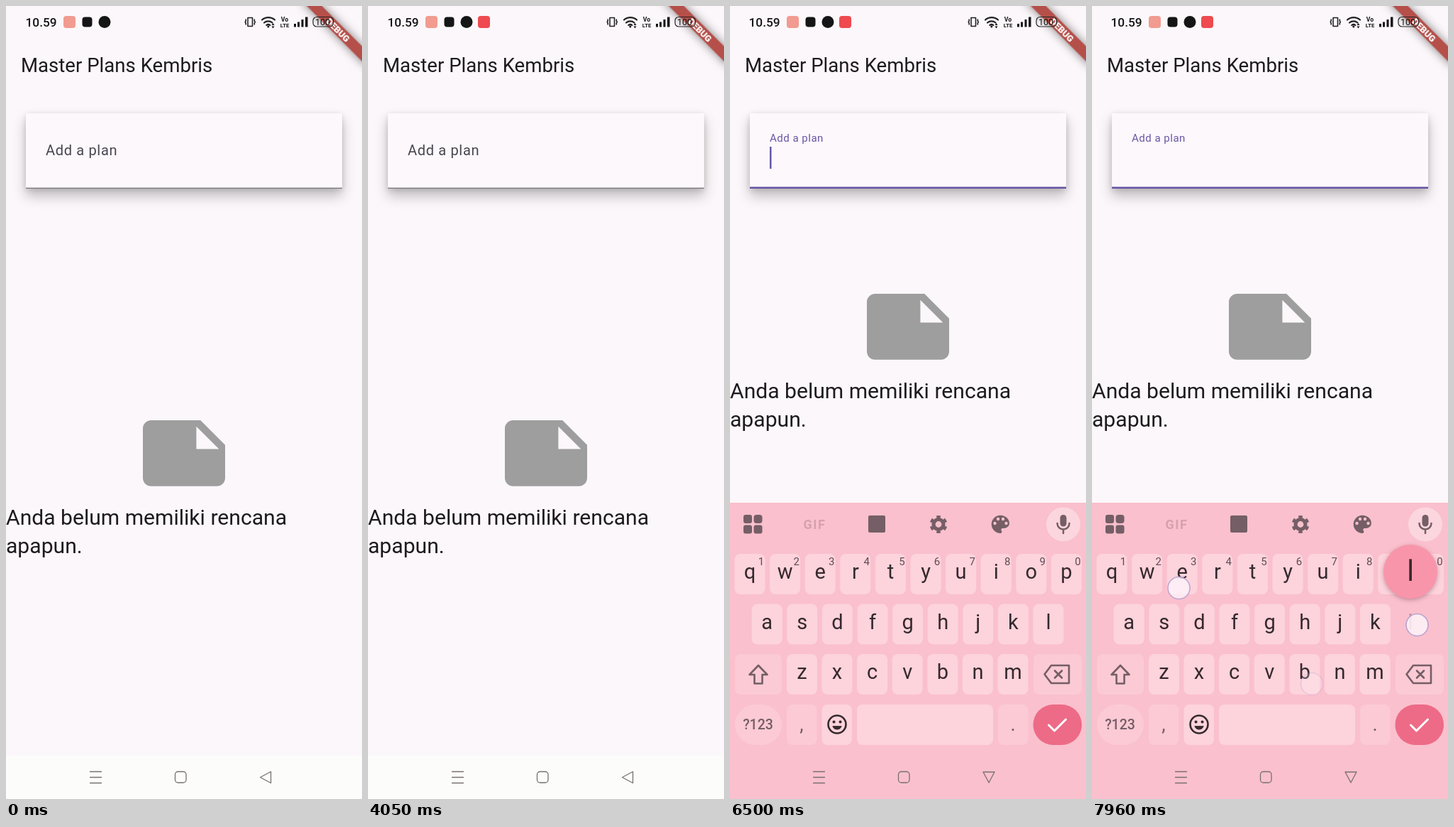
Write an HTML page that moves like this. It is 502 px wide and 1116 px high and loops after 8000 ms.

```html
<!DOCTYPE html>
<html lang="id">
<head>
<meta charset="utf-8">
<title>Master Plans</title>
<style>
  html, body { margin: 0; height: 100%; overflow: hidden; background: #fcf7fa; }
  svg { display: block; width: 100vw; height: 100vh; font-family: Roboto, sans-serif; }
  .mid { text-anchor: middle; }
  .line { fill: none; stroke-linecap: round; stroke-linejoin: round; }
  #card { fill: #fcf8fb; filter: drop-shadow(0 2px 4px rgba(0,0,0,.12)) drop-shadow(0 10px 9px rgba(0,0,0,.24)); }
  #banner { filter: drop-shadow(0 0 7px rgba(0,0,0,.5)); }
  .key { fill: #fdd3dc; }
  .soft { fill: #fbcad5; }
  .popup circle { fill: #f995aa; filter: drop-shadow(0 2px 3px rgba(90,30,50,.35)); }
  .dot { fill: rgba(255,246,252,.8); stroke: #b9a3d0; stroke-width: 1.6; }
</style>
</head>
<body>
<svg viewBox="0 0 502 1116">
  <rect width="502" height="1116" fill="#fcf7fa"/>
  <text x="21" y="92.5" font-size="27.6" fill="#1d1b20">Master Plans Kembris</text>

  <rect id="card" x="28" y="151" width="446" height="106"/>
  <rect id="underline" x="28" width="446"/>
  <text id="label" font-size="20.1" letter-spacing=".63">Add a plan</text>
  <rect id="cursor" x="56" y="198" width="2.5" height="31" fill="#6a57a8"/>

  <g id="empty">
    <path transform="translate(181.4 559.8) scale(5.8)" fill="#9e9e9e" d="M22 10l-6-6H4c-1.1 0-2 .9-2 2v12c0 1.1.9 2 2 2h16c1.1 0 2-.9 2-2zm-7-4.5l5.5 5.5H15z"/>
    <g font-size="30.1" fill="#1d1b20">
      <text x="0" y="729.7">Anda belum memiliki rencana</text>
      <text x="0" y="769.9">apapun.</text>
    </g>
  </g>

  <g id="banner" transform="translate(468.4 33.6) rotate(45)">
    <rect x="-65" y="-7.5" width="130" height="15" fill="#b54f49"/>
    <text class="mid" y="4.6" font-size="12.8" font-weight="900" fill="#fff">DEBUG</text>
  </g>

  <g id="status" fill="#151515">
    <text x="27.5" y="28.8" font-size="17.3" font-weight="500">10.59</text>
    <rect x="81" y="14" width="17" height="17" rx="4" fill="#f29b90"/>
    <rect x="107.5" y="15.5" width="14" height="14" rx="4"/>
    <circle cx="139" cy="22.5" r="8.5"/>
    <rect id="recorder" x="155" y="14" width="17" height="17" rx="4" fill="#ee4a50"/>
    <g class="line" stroke="#222" stroke-width="1.6">
      <path d="M341 16.5h6.5v12h-6.5zM338.2 19v2l-1 1.5 1 1.5v2M350.3 19v2l1 1.5-1 1.5v2"/>
      <path stroke-width="2.2" d="M361 19.5a13.5 13.5 0 0 1 18 0M364 23.5a9 9 0 0 1 11.5 0M367.3 27a4 4 0 0 1 5 0"/>
      <rect x="433" y="15.5" width="28.5" height="13.5" rx="5" stroke-width="1.2"/>
    </g>
    <circle cx="369.8" cy="29" r="1.5"/>
    <path d="M374.5 27l2-3 2 3zM374.5 28.5l2 3 2-3z"/>
    <g class="mid" font-weight="700">
      <text x="393" y="21.8" font-size="8.6">Vo</text>
      <text x="393" y="30" font-size="7.6">LTE</text>
      <text x="446.5" y="27" font-size="12.5" font-weight="400">100</text>
    </g>
    <path d="M406 25h3v4.5h-3zM411 22.5h3v7h-3zM416.5 19h3v10.5h-3zM422 15.5h3.5v14h-3.5z"/>
  </g>

  <g id="keyboard">
    <rect y="699" width="502" height="417" fill="#fac0cd"/>
    <g fill="#755e66">
      <rect x="19" y="716" width="12" height="12" rx="3"/>
      <rect x="33.5" y="716" width="12" height="12" rx="4"/>
      <rect x="19" y="730.5" width="12" height="12" rx="3"/>
      <rect x="33.5" y="730.5" width="12" height="12" rx="3"/>
      <text class="mid" x="119.5" y="736" font-size="18" font-weight="700" letter-spacing="1.5" fill="#d6a0ad">GIF</text>
      <rect x="195" y="717" width="24" height="24" rx="2"/>
      <g fill="none" stroke="#755e66">
        <circle cx="294" cy="729.5" r="7" stroke-width="5.2"/>
        <circle cx="294" cy="729.5" r="10.5" stroke-width="4" pathLength="12" stroke-dasharray="1" stroke-dashoffset="-.5"/>
      </g>
      <path transform="translate(364.5 712.5) scale(1.4)" d="M12 3a9 9 0 0 0 0 18 1.5 1.5 0 0 0 1.1-2.5 1.5 1.5 0 0 1 1.1-2.5H16a5 5 0 0 0 5-5c0-4.4-4-8-9-8z"/>
      <g fill="#fac0cd">
        <circle cx="373.5" cy="728" r="2.2"/><circle cx="378" cy="722" r="2.2"/>
        <circle cx="385" cy="722" r="2.2"/><circle cx="389.5" cy="728" r="2.2"/>
      </g>
      <circle cx="470" cy="729.5" r="24" fill="#fcd6de"/>
      <rect x="465.5" y="716" width="9" height="16.5" rx="4.5"/>
      <path class="line" d="M461.5 728a8.5 8.5 0 0 0 17 0M470 737v5" stroke="#755e66" stroke-width="2.5"/>
    </g>
    <g id="keys"></g>
    <rect class="soft" x="7" y="912" width="66" height="57" rx="8"/>
    <rect class="soft" x="428" y="912" width="68" height="57" rx="8"/>
    <rect class="soft" x="7" y="983" width="66" height="57" rx="28.5"/>
    <rect class="soft" x="80" y="983" width="42.5" height="57" rx="8"/>
    <rect class="key" x="129.5" y="983" width="42.5" height="57" rx="8"/>
    <rect class="key" x="179" y="983" width="192" height="57" rx="8"/>
    <rect class="soft" x="378" y="983" width="42.5" height="57" rx="8"/>
    <rect x="427.5" y="983" width="68.5" height="57" rx="28.5" fill="#ed6b87"/>
    <g class="mid" fill="#755e66">
      <text x="39.5" y="1017.5" font-size="19.5" font-weight="500">?123</text>
      <text x="101" y="1020" font-size="27">,</text>
      <text x="399" y="1020" font-size="27">.</text>
    </g>
    <g class="line" stroke="#755e66" stroke-width="2.6">
      <path d="M40 928L27.5 941H34.5V953.5H45.5V941H52.5Z"/>
      <path d="M453 928H478V953H453L443.5 940.5ZM458 935.5l10 10M468 935.5l-10 10"/>
      <path stroke="#fff" stroke-width="3" d="M449.5 1012l8 8 16-16"/>
      <g stroke="#35292d">
        <circle cx="151" cy="1011" r="12.5"/>
        <path d="M145 1014a6.5 6.5 0 0 0 12 0z" fill="#35292d" stroke-width="1"/>
        <path stroke-width="4" d="M146.5 1007.5h.1M155.5 1007.5h.1"/>
      </g>
    </g>
  </g>

  <rect y="1055" width="502" height="61" fill="#fcfdfa"/>
  <rect id="imeBar" width="502" height="61" fill="#fac0cd"/>
  <g id="nav" class="line" stroke="#77706f" stroke-width="1.3">
    <path d="M118.5 1077.5h16M118.5 1085.5h16M118.5 1093.5h16"/>
    <rect x="238.5" y="1077.5" width="15.5" height="15.5" rx="4"/>
    <path id="back" d="M358.5 1085.5L373.5 1077.5V1093.5Z"/>
  </g>
  <g id="popups"></g>
  <g id="dots"></g>
</svg>
<script>
const LOOP = 8000;
const $ = id => document.getElementById(id);
const set = (el, attrs) => { for (const k in attrs) el.setAttribute(k, attrs[k]); };
const fade = (el, opacity) => set(el, { opacity: +opacity });
const ramp = (t, a, b) => Math.min(1, Math.max(0, (t - a) / (b - a)));
const easeOut = p => 1 - (1 - p) ** 2;
const mix = (a, b, p) => a + (b - a) * p;
const within = (t, a, b) => t >= a && t < b;

function add(parent, tag, attrs, text = '') {
  const el = document.createElementNS('http://www.w3.org/2000/svg', tag);
  set(el, attrs);
  el.textContent = text;
  return parent.appendChild(el);
}

const keys = {};
[['qwertyuiop', 28, 771], ['asdfghjkl', 52.2, 841.5], ['zxcvbnm', 101.4, 912]].forEach(([letters, left, y], row) => {
  [...letters].forEach((ch, i) => {
    const x = left + i * 49.6;
    const cap = add($('keys'), 'rect', { class: 'key', x: x - 21.5, y, width: 43, height: 57, rx: 8 });
    const letter = add($('keys'), 'text', { class: 'mid', x, y: y + 35, 'font-size': 29, fill: '#35292d' }, ch);
    if (!row) add($('keys'), 'text', { class: 'mid', x: x + 16, y: y + 16, 'font-size': 15, fill: '#604a52' }, (i + 1) % 10);
    keys[ch] = { ch, x, y, cap, letter };
  });
});

// x, y, touch time, release time, key under the finger
const taps = [
  [322.5, 183, 5000, 5170],
  [52.5, 966, 7480, 7600],
  [310, 954, 7680, 7790, 'b'],
  [122.5, 819, 7800, 7945, 'e'],
  [458.5, 871, 7900, 8000, 'l']
].map(([x, y, down, up, ch]) => {
  const tap = { down, up, key: keys[ch], dot: add($('dots'), 'circle', { class: 'dot', cx: x, cy: y, r: 15.5 }) };
  if (tap.key) {
    const { x: kx, y: ky } = tap.key;
    tap.popup = add($('popups'), 'g', { class: 'popup' });
    add(tap.popup, 'circle', { cx: kx, cy: ky - 45.5, r: 38 });
    add(tap.popup, 'text', { class: 'mid', x: kx, y: ky - 33, 'font-size': 40, fill: '#35292d' }, ch === 'b' ? 'B' : ch);
  }
  return tap;
});

function render(t) {
  fade($('recorder'), ramp(t, 1680, 1900));

  const nudge = `translate(${t >= 4300 ? -1 : 0})`;
  set($('status'), { transform: nudge });
  set($('nav'), { transform: nudge });

  const bar = t < 5900 ? 0 : easeOut(ramp(t, 5864, 6260));
  set($('imeBar'), { y: 1116 - 61 * bar });
  set($('back'), { transform: `rotate(${-90 * easeOut(ramp(t, 5930, 6290))} 366 1085.5)` });

  const open = easeOut(ramp(t, 6420, 6500));
  const focused = open > 0;
  fade($('keyboard'), focused);
  set($('keyboard'), { transform: `translate(0 ${356 * (1 - open)})` });
  set($('empty'), { transform: `translate(0 ${-178 * open})` });
  set($('label'), {
    transform: `translate(56 ${mix(210.2, 191, open)}) scale(${mix(1, .75, open)})`,
    fill: focused ? '#6a55a6' : '#49454f'
  });
  set($('underline'), focused
    ? { y: 254.5, height: 2.5, fill: '#6553a4' }
    : { y: 255.7, height: 1.3, fill: '#777477' });
  fade($('cursor'), within(t, 6440, 6880) || within(t, 7270, 7770));

  const upper = within(t, 7600, 7790);
  for (const { ch, cap, letter } of Object.values(keys)) {
    letter.textContent = upper ? ch.toUpperCase() : ch;
    fade(letter, 1);
    fade(cap, 1);
  }
  for (const { down, up, key, dot, popup } of taps) {
    fade(dot, t < down ? 0 : 1 - ramp(t, up, up + 240));
    if (!key) continue;
    const pressed = within(t, down, up);
    fade(popup, pressed);
    if (pressed) {
      fade(key.cap, 0);
      fade(key.letter, .3);
    }
  }
}

function tick() {
  render(performance.now() % LOOP);
  requestAnimationFrame(tick);
}
tick();
</script>
</body>
</html>
```
